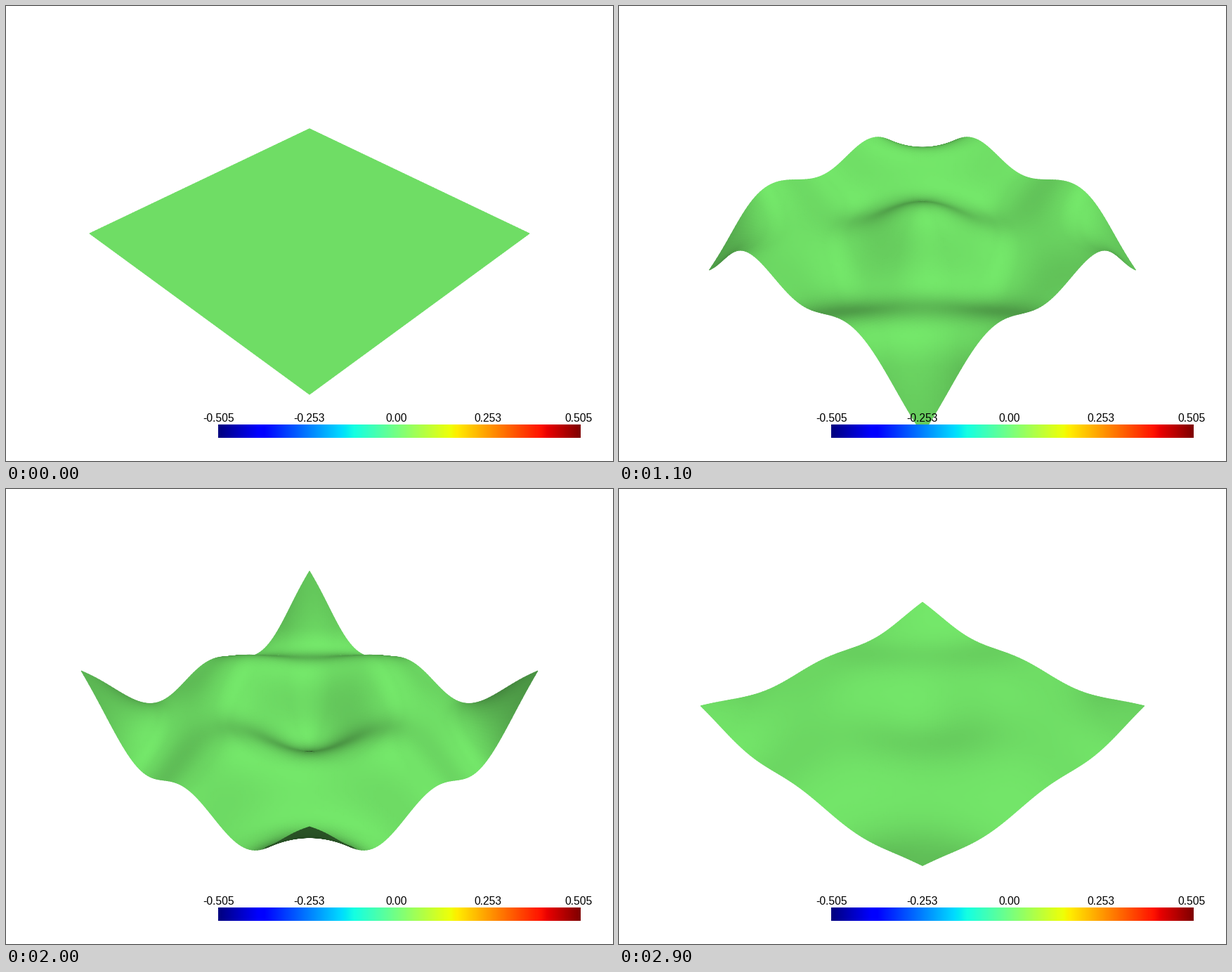
A matplotlib script that plays this animation: 864x648 px, repeating every 3000 ms.

```python
"""Vibrating free square plate, seen in perspective, with a colour scale."""
import matplotlib.pyplot as plt
import numpy as np
from matplotlib.animation import ArtistAnimation
from matplotlib.colors import LinearSegmentedColormap
from numpy.polynomial import legendre as leg

W, H, DPI = 864, 648, 100
FRAMES, INTERVAL = 30, 100
CELLS = 90
POISSON = 0.3
MODE = 4                       # fifth fully symmetric mode
AMPLITUDE = 0.2 * np.sqrt(2)   # corner travel, in half diagonals
VIEW = np.radians(15)          # half the camera's view angle
DIST = 1 / np.sin(VIEW)
FOCAL = H / 2 / np.tan(VIEW)
SIN, COS = np.sqrt(1 / 3), np.sqrt(2 / 3)   # camera elevation


def plate_mode(u):
    """Ritz solution of a free Kirchhoff plate on the grid u x u."""
    deg = np.arange(0, 13, 2)
    n = len(deg)
    coef = np.eye(deg[-1] + 1)[:, deg] * np.sqrt(deg + 0.5)
    x, w = leg.leggauss(24)
    p, dp, ddp = (leg.legval(x, leg.legder(coef, k)) for k in range(3))
    a, b, c = (ddp * w) @ ddp.T, (ddp * w) @ p.T, (dp * w) @ dp.T
    eye = np.eye(n)
    stiff = (np.kron(a, eye) + np.kron(eye, a)
             + POISSON * (np.kron(b, b.T) + np.kron(b.T, b))
             + 2 * (1 - POISSON) * np.kron(c, c))
    # keep only shapes that stay the same when x and y are swapped
    pairs = []
    for i in range(n):
        for j in range(i, n):
            m = np.zeros((n, n))
            m[i, j] = m[j, i] = 1
            pairs.append(m.ravel() / np.linalg.norm(m))
    sym = np.array(pairs).T
    _, vec = np.linalg.eigh(sym.T @ stiff @ sym)
    mode = (sym @ vec[:, MODE]).reshape(n, n)
    q = leg.legval(u, coef)
    z = q.T @ mode @ q
    return -z / z[-1, -1]


def to_camera(a, b, z):
    """Right, up and towards-the-eye parts of a vector."""
    return a, COS * z - SIN * b, COS * b + SIN * z


def direction(elev, azim):
    e, a = np.radians([elev, azim])
    return np.cos(e) * np.sin(a), np.sin(e), np.cos(e) * np.cos(a)


LIGHTS = [
    (0.75, direction(50, 10)),
    (0.25, direction(-75, 0)),
    (0.25, direction(0, 0)),
    (0.214, direction(0, 110)),
    (0.214, direction(0, -110)),
]

u = np.linspace(-1, 1, CELLS + 1)
gx, gy = np.meshgrid(u, u, indexing="ij")
side, front = (gy - gx) / 2, (gx + gy) / 2
shape = plate_mode(u)
sx, sy = np.gradient(shape, u, u, edge_order=2)


def project(scale):
    x, y, near = to_camera(side, front, scale * shape)
    k = FOCAL / (DIST - near)
    return W / 2 + k * x, H / 2 - k * y


def shade(scale):
    n = np.array(to_camera(scale * (sx - sy), -scale * (sx + sy), 1.0 + 0 * sx))
    n /= np.linalg.norm(n, axis=0)
    n *= np.where(n[2] < 0, -1, 1)   # light both faces
    return sum(p * np.clip(np.tensordot(d, n, 1), 0, None) for p, d in LIGHTS)


fig = plt.figure(figsize=(W / DPI, H / DPI), dpi=DPI, facecolor="white")
ax = fig.add_axes([0, 0, 1, 1])
ax.axis("off")

green = LinearSegmentedColormap.from_list(
    "plate", ["black", (125 / 255, 249 / 255, 114 / 255)], N=1024)
frames = []
for i in range(FRAMES):
    s = AMPLITUDE * np.sin(2 * np.pi * i / FRAMES)
    mesh = ax.pcolormesh(*project(s), shade(s), shading="gouraud",
                         cmap=green, vmin=0, vmax=1, zorder=1)
    frames.append([mesh])

ax.imshow(np.linspace(0, 1, 256)[None], cmap="jet", aspect="auto",
          interpolation="nearest", extent=(302, 817.5, 615, 596), zorder=2)
labels = [(302.5, "-0.505"), (431.5, "-0.253"), (555.5, "0.00"),
          (686, "0.253"), (814.5, "0.505")]
for x, text in labels:
    ax.text(x, 591.5, text, ha="center", va="baseline", color="black",
            family="Liberation Sans", size=15.6 * 72 / DPI, zorder=3)

ax.set_xlim(0, W)
ax.set_ylim(H, 0)

anim = ArtistAnimation(fig, frames, interval=INTERVAL, repeat=True,
                       repeat_delay=0)
plt.show()
```
